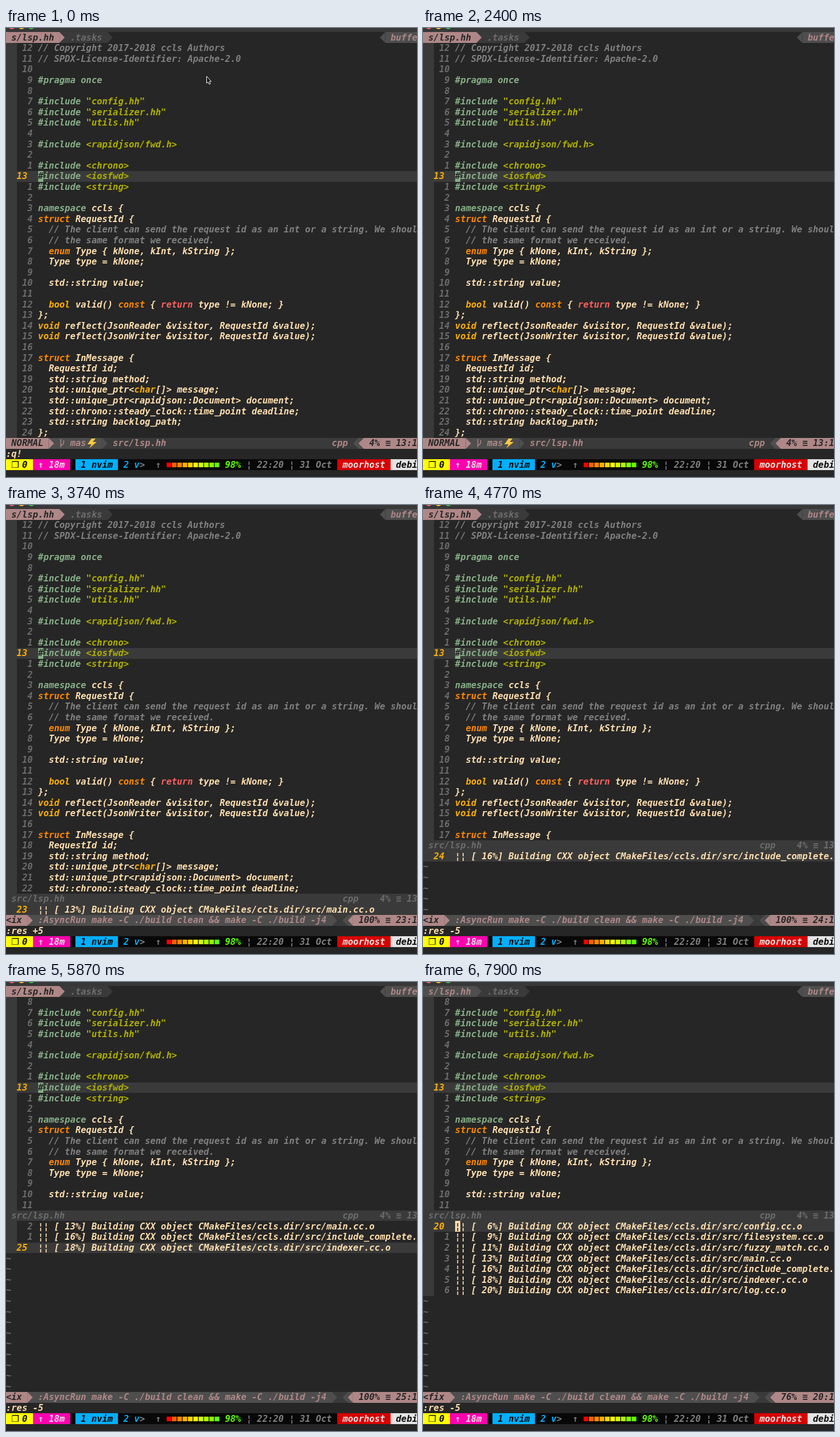
An HTML page with a canvas that plays this animation: 716x782 px, repeating every 8 s.

```html
<!DOCTYPE html>
<html lang="en">
<head>
<meta charset="utf-8">
<title>Editor build session</title>
<style>
html, body { margin: 0; width: 100%; height: 100%; overflow: hidden; background: #262626; }
canvas { display: block; }
</style>
</head>
<body>
<canvas id="stage" width="716" height="782"></canvas>
<script>
const ctx = document.getElementById('stage').getContext('2d');
const LOOP = 8000, CELL_W = 9.305, CELL_H = 18.6, TOP = 7.2, COLS = 77;
const FONT = 'bold 15.5px "DejaVu Sans Mono", "DejaVu Sans", monospace';
const BG = '#262626', PANEL = '#3a3a3a', MID = '#4e4e4e', ROSE = '#af8787', DIM = '#6c6c6c',
  GRAY = '#808080', CREAM = '#ffdfaf', GOLD = '#ffaf00', ORANGE = '#ff8700', GREEN = '#87af87',
  OLIVE = '#afaf00', PINK = '#d787af', RED = '#ff5f5f', LIGHT = '#e4e4e4', BLACK = '#080808', BLUE = '#00afff';

const code = `// Copyright 2017-2018 ccls Authors
// SPDX-License-Identifier: Apache-2.0

#pragma once

#include "config.hh"
#include "serializer.hh"
#include "utils.hh"

#include <rapidjson/fwd.h>

#include <chrono>
#include <iosfwd>
#include <string>

namespace ccls {
struct RequestId {
  // The client can send the request id as an int or a string. We should use
  // the same format we received.
  enum Type { kNone, kInt, kString };
  Type type = kNone;

  std::string value;

  bool valid() const { return type != kNone; }
};
void reflect(JsonReader &visitor, RequestId &value);
void reflect(JsonWriter &visitor, RequestId &value);

struct InMessage {
  RequestId id;
  std::string method;
  std::unique_ptr<char[]> message;
  std::unique_ptr<rapidjson::Document> document;
  std::chrono::steady_clock::time_point deadline;
  std::string backlog_path;
};`.split('\n');
const CURSOR_LINE = 12;
const keywords = { namespace: GREEN, struct: ORANGE, enum: ORANGE, const: ORANGE,
  bool: GOLD, void: GOLD, char: GOLD, return: RED };

const BUILD = 'make -C ./build clean && make -C ./build -j4';
const tasks = [
  ['A-project-build', 'local', BUILD],
  ['file-build', 'global', 'g++ "$(VIM_FILEPATH)" -lgtest -lpthread'],
  ['file-compile', 'global', 'g++ "$(VIM_FILEPATH)" -lgtest -lpthread'],
  ['file-run', 'global', '"$(VIM_PATHNOEXT)"'],
  ['gatsby-run', 'global', 'gatsby develop'],
  ['project-build', 'global', 'make -j4'],
  ['project-clean', 'global', 'make clean'],
];

// Build log from line 12 on; compiled objects start at line 18.
const setup = ['-- Found Threads: TRUE', '-- Configuring done', '-- Generating done',
  '-- Build files have been written to: ./build', 'make[1]: Entering directory',
  'Scanning dependencies of target ccls'];
const objects = ['clang_tu', 'clang_complete', 'config', 'filesystem', 'fuzzy_match',
  'main', 'include_complete', 'indexer', 'log'];
function logText(n) {
  if (n < 18) return '¦¦ ' + setup[n - 12];
  const percent = String(Math.floor((n - 17) / 43 * 100)).padStart(3);
  return `¦¦ [${percent}%] Building CXX object CMakeFiles/ccls.dir/src/${objects[n - 18]}.cc.o`;
}

// Each step changes part of the state from its time (ms) on.
const steps = [
  [0, { split: 38, top: 0, focus: 'code', cmd: ':q!', keys: '', mouse: true }],
  [500, { mouse: false, keys: '<20>' }],
  [640, { keys: '' }],
  [1140, { split: 30, top: 3, focus: 'fuzzy', cmd: '' }],
  [2400, { split: 38, top: 0, focus: 'code' }],
  [2470, { split: 31, first: 12, last: 17, current: 17 }],
  [2670, { first: 18, last: 23, current: 23 }],
  [3740, { split: 36, first: 23, cmd: ':res +5' }],
  [4140, { first: 24, last: 24, current: 24 }],
  [4770, { split: 31, cmd: ':res -5' }],
  [5100, { split: 26, top: 2 }],
  [5240, { split: 21, top: 4 }],
  [5870, { first: 23, last: 25, current: 25 }],
  [6140, { keys: '^W' }],
  [6900, { keys: '^Wj' }],
  [7140, { keys: '', focus: 'log' }],
  [7300, { last: 26 }],
  [7900, { first: 20, current: 20 }],
];
const stateAt = t => Object.assign({}, ...steps.filter(s => s[0] <= t).map(s => s[1]));

const X = col => col * CELL_W;
const Y = row => TOP + row * CELL_H;

function fill(col, row, width, color) {
  const x = Math.round(X(col)), y = Math.round(Y(row));
  ctx.fillStyle = color;
  ctx.fillRect(x, y, Math.round(X(col + width)) - x, Math.round(Y(row + 1)) - y);
}
function text(col, row, str, color, bg) {
  if (bg) fill(col, row, str.length, bg);
  ctx.fillStyle = color;
  [...str].forEach((ch, i) => {
    if (ch === ' ') return;
    ctx.font = (ch === '¦' ? '' : 'italic ') + FONT;
    ctx.fillText(ch, X(col + i), Y(row) + 14.3);
  });
}
function shape(points, color) {
  ctx.fillStyle = color;
  ctx.beginPath();
  points.forEach(p => ctx.lineTo(...p));
  ctx.closePath();
  ctx.fill();
}
function arrow(col, row, color, bg, left) {
  fill(col, row, 1, bg);
  const [base, tip] = left ? [col + 1, col] : [col, col + 1];
  const y = Math.round(Y(row)), end = Math.round(Y(row + 1));
  shape([[X(base), y], [X(tip), (y + end) / 2], [X(base), end]], color);
}
function block(col, row, ch, color) {
  text(col, row, ch, BG, color);
}

function drawTabs(active) {
  const bg = active ? ROSE : MID;
  text(0, 0, ' s/lsp.hh ', active ? BG : ROSE, bg);
  arrow(10, 0, bg, PANEL);
  text(11, 0, ' .tasks ', DIM, PANEL);
  arrow(19, 0, PANEL, BG);
  arrow(70, 0, MID, BG, true);
  text(71, 0, ' buffe', ROSE, MID);
}

function drawNumber(row, distance, line) {
  fill(0, row, 2, PANEL);
  if (distance) return text(2, row, String(distance).padStart(3), DIM);
  fill(2, row, COLS, PANEL);
  text(2, row, String(line), GOLD);
}

function drawCodeLine(row, line) {
  if (/^\s*\/\//.test(line)) return text(6, row, line, GRAY);
  const directive = line[0] === '#';
  let col = 6;
  for (const [part] of line.matchAll(directive ? /#\w+|[^#]+/g : /\w+|\W+/g)) {
    const color = directive ? (/["<]/.test(part) ? OLIVE : GREEN) : keywords[part] || CREAM;
    text(col, row, part, color);
    col += part.length;
  }
}

function drawCode(s) {
  for (let row = 1; row < s.split; row++) {
    const i = s.top + row - 1;
    drawNumber(row, Math.abs(i - CURSOR_LINE), i + 1);
    drawCodeLine(row, code[i]);
  }
  if (s.focus === 'code') block(6, CURSOR_LINE - s.top + 1, '#', GREEN);
}

function drawPosition(percent, position) {
  const label = percent + '%', col = 70 - label.length;
  arrow(col - 3, 38, MID, PANEL, true);
  arrow(col - 2, 38, ROSE, MID, true);
  fill(col - 1, 38, COLS, ROSE);
  text(col, 38, `${label} ≡ ${position}`, BG);
}

function drawCodeStatus() {
  fill(0, 38, COLS, PANEL);
  text(0, 38, ' NORMAL ', BG, ROSE);
  arrow(8, 38, ROSE, MID);
  text(9, 38, '   mas   ', ROSE, MID);
  arrow(18, 38, MID, PANEL);
  text(20, 38, 'src/lsp.hh', ROSE);
  text(61, 38, 'cpp', ROSE);
  ctx.strokeStyle = ROSE;
  ctx.lineWidth = 1.5;
  ctx.stroke(new Path2D('M95.5 716v14M100.5 718v4q0 3-5 5'));
  shape([[149, 715], [142, 725], [149, 725], [145, 732], [158, 721], [151, 721], [156, 715]], '#ffc83d');
  drawPosition(4, '13:1');
}

function drawInactiveStatus(row) {
  fill(0, row, COLS, PANEL);
  text(1, row, 'src/lsp.hh', DIM);
  text(63, row, 'cpp    4% ≡ 13:1', DIM);
}

function drawFuzzy() {
  fill(0, 31, COLS, PANEL);
  tasks.forEach(([name, scope, command], i) => {
    text(2, 31 + i, name, PINK);
    text(27, 31 + i, `<${scope}>`, GOLD);
    text(37, 31 + i, ':', GOLD);
    text(40, 31 + i, command, GRAY);
  });
  text(0, 38, '-- INSERT --', GOLD);
  text(12, 38, '  tasks (7/7)'.padEnd(40), CREAM, MID);
  text(53, 38, '/home/moorhost/prj/ccls', GRAY);
  text(0, 39, 'FUZZY >', GOLD);
  block(8, 39, ' ', CREAM);
}

function drawLog(s) {
  for (let row = s.split + 1; row < 38; row++) {
    const line = s.first + row - s.split - 1;
    if (line > s.last) {
      text(0, row, '~', DIM);
      continue;
    }
    drawNumber(row, Math.abs(line - s.current), line);
    text(6, row, logText(line), CREAM);
    if (s.focus === 'log' && line === s.current) block(6, row, '¦', CREAM);
  }
  const percent = Math.floor(s.current / s.last * 100);
  const label = percent === 100 ? '<ix ' : '<fix ', n = label.length;
  fill(0, 38, COLS, PANEL);
  text(0, 38, label, BG, ROSE);
  arrow(n, 38, ROSE, MID);
  text(n + 1, 38, ` :AsyncRun ${BUILD} `, ROSE, MID);
  arrow(n + 57, 38, MID, PANEL);
  drawPosition(percent, s.current + ':1');
}

function drawTerminalBar() {
  fill(0, 40, COLS, BLACK);
  text(0, 40, ' ❐ 0 ', BLACK, '#ffff00');
  text(5, 40, ' ↑ 18m ', LIGHT, '#ff00af');
  text(13, 40, ' 1 nvim ', BLACK, BLUE);
  text(22, 40, '2 v', BLUE);
  text(25, 40, '>  ↑', GRAY);
  ['f00', 'ff5f00', 'ff8700', 'ffaf00', 'ffd700', 'ff0', 'd7ff00', 'afff00', '87ff00', '5fff00']
    .forEach((color, i) => {
      ctx.fillStyle = '#' + color;
      ctx.fillRect(X(30 + i) + .7, 757, 8, 8);
    });
  text(41, 40, '98%', '#5fff00');
  text(45, 40, '¦ 22:20 ¦ 31 Oct', GRAY);
  text(62, 40, ' moorhost ', LIGHT, '#d70000');
  text(72, 40, ' debi', BLACK, LIGHT);
}

function drawTitleBar() {
  ctx.fillStyle = '#383838';
  ctx.fillRect(0, 0, 716, 7);
  ['#ff5f57', '#febc2e', '#28c840'].forEach((color, i) => {
    ctx.fillStyle = color;
    ctx.beginPath();
    ctx.arc(10 + 17 * i, -3.5, 5.5, 0, 7);
    ctx.fill();
  });
}

function drawMouse() {
  const pointer = [[349.5, 84], [349.5, 96], [352, 94], [354, 98], [356, 97], [354.3, 93], [357.5, 93]];
  shape(pointer, '#111');
  ctx.strokeStyle = '#fff';
  ctx.lineWidth = 1;
  ctx.stroke();
}

function draw(now) {
  const s = stateAt(now % LOOP);
  ctx.fillStyle = BG;
  ctx.fillRect(0, 0, 716, 782);
  drawTitleBar();
  drawTabs(s.focus === 'code');
  drawCode(s);
  if (s.split === 38) drawCodeStatus();
  else {
    drawInactiveStatus(s.split);
    if (s.focus === 'fuzzy') drawFuzzy();
    else drawLog(s);
  }
  text(0, 39, s.cmd, CREAM);
  text(69, 39, s.keys, CREAM);
  drawTerminalBar();
  if (s.mouse) drawMouse();
}

const start = performance.now();
function tick() {
  draw(performance.now() - start);
  requestAnimationFrame(tick);
}
tick();
</script>
</body>
</html>
```
